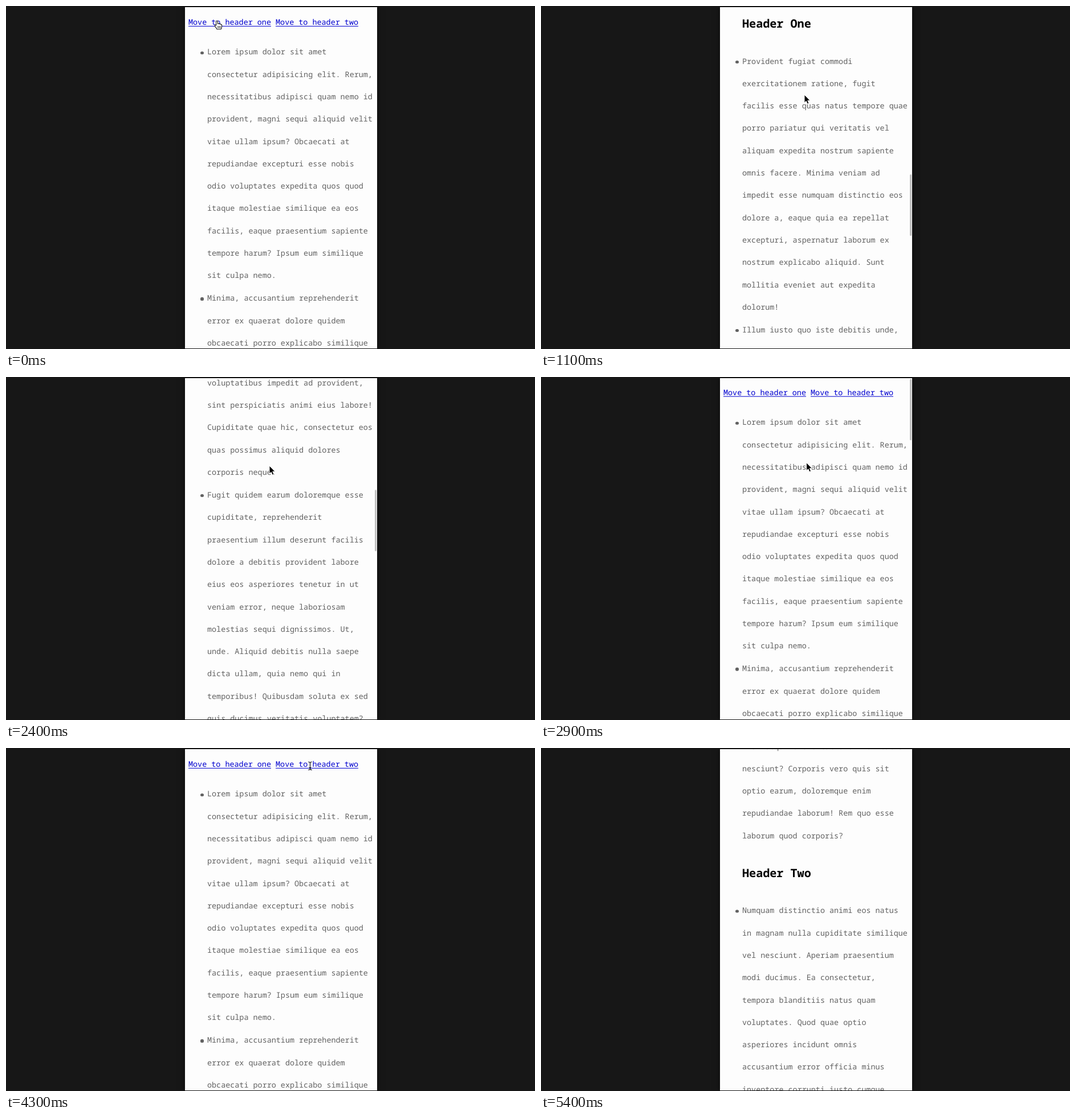
An HTML page for the animation above (6.2 s loop, 928 px wide and 603 px high).

```html
<!DOCTYPE html>
<html lang="en">
<head>
<meta charset="utf-8">
<title>Smooth scroll to header</title>
<style>
  html, body { margin: 0; width: 100%; height: 100%; overflow: hidden; background: #171717; }
  #stage { position: relative; width: 928px; height: 603px; overflow: hidden; }
  #panel {
    position: absolute; left: 314px; top: 2px; width: 337px; height: 600px;
    overflow: hidden; background: #fdfdfd;
  }
  #shade {
    position: absolute; left: 314px; top: 2px; width: 337px; height: 600px;
    box-shadow: 0 0 10px rgba(0, 0, 0, .55);
  }
  #page {
    position: absolute; left: 0; top: 0; width: 337px;
    font: 13.43px/39.3px "Noto Sans Mono", "DejaVu Sans Mono", monospace;
    text-rendering: geometricPrecision; color: #626262; white-space: pre;
  }
  nav { position: absolute; left: 6px; top: 6.6px; }
  nav span { color: #0000cf; text-decoration: underline; text-decoration-thickness: 1px; text-underline-offset: 2px; }
  #list { position: absolute; left: 39px; top: 59.35px; }
  #list p { position: relative; margin: 0 0 .7px; }
  #list p::before {
    content: ""; position: absolute; left: -11.6px; top: 18.2px;
    width: 5.2px; height: 5.2px; border-radius: 50%; background: #626262;
  }
  #list h2 { margin: 0; padding-bottom: 1.7px; font-size: 20.14px; line-height: 89.9px; font-weight: 700; color: #000; }
  #thumb { position: absolute; left: 333px; top: 0; width: 3px; height: 108px; border-radius: 2px; background: #c1c1c1; }
  #cursor { position: absolute; left: 0; top: 0; overflow: visible; }
</style>
</head>
<body>
<div id="stage">
  <div id="shade"></div>
  <div id="panel">
    <div id="page">
      <nav><span>Move to header one</span> <span>Move to header two</span></nav>
      <div id="list"></div>
    </div>
    <div id="thumb"></div>
  </div>
  <svg id="cursor" width="1" height="1">
    <g id="arrow">
      <path d="M0 -1V13.2L3.2 10.2L5.4 15.2L8 14L5.8 9.2H10Z" fill="#000" stroke="#fff" stroke-width="1"/>
    </g>
    <g id="hand" fill="#fff" stroke="#111" stroke-width="1.1" stroke-linejoin="round" stroke-linecap="round">
      <path d="M-1.3 8V1.2Q-1.3 0 0 0T1.5 1.2V5.2Q3 4.2 4.2 5.6Q5.8 4.8 6.6 6.3Q8.6 5.8 8.6 8V10.5Q8.4 12.5 7.2 14.8H0Q-1 12.6 -3.6 9.4Q-4.2 7.6 -2.6 7.5Z"/>
      <path d="M1.8 9.5V12.5M4 9.5V12.5M6.1 9.5V12.5" stroke-width=".9"/>
    </g>
    <g id="beam" fill="none" stroke="#111" stroke-width="1.2">
      <path d="M-2.8 -6.5Q.5 -6.5 .5 -4.5Q.5 -6.5 3.8 -6.5M.5 -5V6M-2.8 7.5Q.5 7.5 .5 5.5Q.5 7.5 3.8 7.5M-1.2 3.5H2.2"/>
    </g>
  </svg>
</div>
<script>
// Blocks are separated by blank lines; "# " marks a header.
const text = `
Lorem ipsum dolor sit amet
consectetur adipisicing elit. Rerum,
necessitatibus adipisci quam nemo id
provident, magni sequi aliquid velit
vitae ullam ipsum? Obcaecati at
repudiandae excepturi esse nobis
odio voluptates expedita quos quod
itaque molestiae similique ea eos
facilis, eaque praesentium sapiente
tempore harum? Ipsum eum similique
sit culpa nemo.

Minima, accusantium reprehenderit
error ex quaerat dolore quidem
obcaecati porro explicabo similique
nihil veniam, tempora quos ratione
assumenda. Quia modi nesciunt harum
itaque voluptas, saepe eligendi quod
dolorum fugiat a officiis. Magni
perferendis eos, quibusdam aperiam
molestiae vero.

Quaerat sunt, architecto inventore
tenetur dolores vitae nulla ipsam
officia. Sapiente rem eveniet nobis
laudantium, cumque optio maiores
voluptatibus impedit ad provident,
sint perspiciatis animi eius labore!
Cupiditate quae hic, consectetur eos
quas possimus aliquid dolores
corporis neque.

Fugit quidem earum doloremque esse
cupiditate, reprehenderit
praesentium illum deserunt facilis
dolore a debitis provident labore
eius eos asperiores tenetur in ut
veniam error, neque laboriosam
molestias sequi dignissimos. Ut,
unde. Aliquid debitis nulla saepe
dicta ullam, quia nemo qui in
temporibus! Quibusdam soluta ex sed
quis ducimus veritatis voluptatem?

# Header One

Provident fugiat commodi
exercitationem ratione, fugit
facilis esse quas natus tempore quae
porro pariatur qui veritatis vel
aliquam expedita nostrum sapiente
omnis facere. Minima veniam ad
impedit esse numquam distinctio eos
dolore a, eaque quia ea repellat
excepturi, aspernatur laborum ex
nostrum explicabo aliquid. Sunt
mollitia eveniet aut expedita
dolorum!

Illum iusto quo iste debitis unde,
quisquam tempora natus harum minus
deleniti. Ullam cum, repellat ipsa
accusamus velit autem dolorem fuga
voluptate nemo, sapiente ad quidem
blanditiis? Itaque fugiat possimus
nisi sequi exercitationem veritatis
nesciunt? Corporis vero quis sit
optio earum, doloremque enim
repudiandae laborum! Rem quo esse
laborum quod corporis?

# Header Two

Numquam distinctio animi eos natus
in magnam nulla cupiditate similique
vel nesciunt. Aperiam praesentium
modi ducimus. Ea consectetur,
tempora blanditiis natus quam
voluptates. Quod quae optio
asperiores incidunt omnis
accusantium error officia minus
inventore corrupti iusto cumque
nobis pariatur debitis nesciunt
sequi, eaque eos aliquam voluptatum,
dolor vitae rerum. Quasi facere
molestias ipsum, tenetur autem id
saepe voluptas magni earum fugit
officiis ratione.`;

const LOOP = 6200, STEP = 100;
const SPRING = Math.sqrt(250) / 1000; // critically damped, per ms
const THUMB_RATIO = 0.1776, THUMB_LAG = 7.5;

const scrolls = [
  { start: 290, from: 0, to: 1650 },
  { start: 1500, from: 1650, to: 2746 },
  { start: 2264.7, from: 2746, to: 0 },
  { start: 4314.5, from: 0, to: 2458.5 },
];
const moves = [
  { start: 300, end: 900, from: [370, 26], to: [462, 157] },
  { start: 2800, end: 3500, from: [462, 157], to: [526, 58] },
  { start: 3500, end: 4000, from: [526, 58], to: [533, 31] },
];
const shapes = [[0, "hand"], [400, "arrow"], [1500, "beam"], [2300, "arrow"], [3800, "hand"], [4300, "beam"]];

const $ = id => document.getElementById(id);
const clamp = v => Math.min(1, Math.max(0, v));
const lastStarted = (items, t) => items.filter(item => item.start <= t).pop() || items[0];

for (const block of text.trim().split("\n\n")) {
  const isHeader = block.startsWith("# ");
  const el = document.createElement(isHeader ? "h2" : "p");
  el.textContent = isHeader ? block.slice(2) : block;
  $("list").append(el);
}

function scrollAt(t) {
  const { start, from, to } = lastStarted(scrolls, t);
  const x = Math.max(0, t - start) * SPRING;
  return to + (from - to) * (1 + x) * Math.exp(-x);
}

function cursorAt(t) {
  const { start, end, from, to } = lastStarted(moves, t);
  const u = clamp((t - start) / (end - start));
  const eased = u * u * (3 - 2 * u);
  return from.map((v, i) => v + (to[i] - v) * eased);
}

function thumbOpacity(t) {
  if (t >= 800 && t < 1700) return clamp((1600 - t) / 200);
  if (t >= 2300) return clamp((4300 - t) / 300);
  return 0;
}

function draw(t) {
  $("page").style.transform = `translateY(${-scrollAt(t)}px)`;
  $("thumb").style.transform = `translateY(${1 + scrollAt(t - THUMB_LAG) * THUMB_RATIO}px)`;
  $("thumb").style.opacity = thumbOpacity(t);

  const [x, y] = cursorAt(t);
  const shape = shapes.filter(([start]) => start <= t).pop()[1];
  for (const id of ["arrow", "hand", "beam"]) $(id).style.display = id === shape ? "" : "none";
  $("cursor").style.transform = `translate(${x}px, ${y}px)`;
  $("cursor").style.opacity = clamp((5400 - t) / 200);
}

const origin = performance.now();
function tick() {
  const t = (performance.now() - origin) % LOOP;
  draw(Math.floor(t / STEP) * STEP);
  requestAnimationFrame(tick);
}
tick();
</script>
</body>
</html>
```
